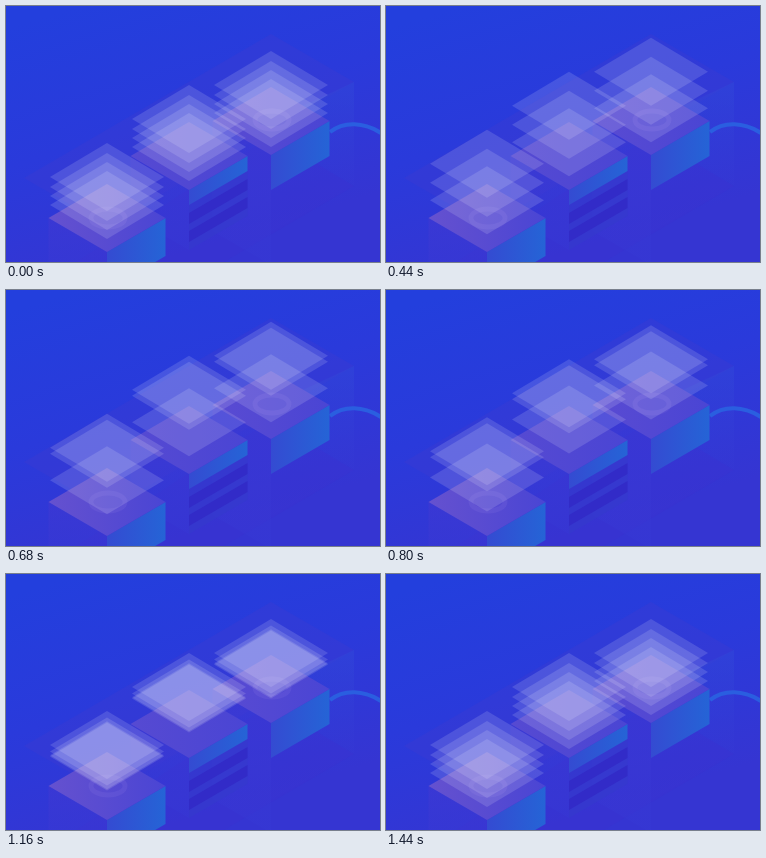
Recreate the animation shown at these times as an HTML page with a canvas. Size 374x256 px, loop 1.64 s.

```html
<!DOCTYPE html>
<html lang="en">
<head>
<meta charset="utf-8">
<title>Floating layers</title>
<style>
html, body { margin: 0; width: 100%; height: 100%; overflow: hidden; background: #283bd9; }
canvas { display: block; }
</style>
</head>
<body>
<canvas id="stage" width="374" height="256"></canvas>
<script>
const ctx = document.getElementById('stage').getContext('2d');
const LOOP = 1640, STEP = 40;
const HALF_W = 58.5, HALF_H = 34;

// Each phase slides its sheets from one height to another
const phases = [
  { start: 0, length: 560, slides: [[79, 62], [98, 81], [107, 101]] },
  { start: 560, length: 560, slides: [[62, 79], [68, 85], [101, 88]] },
  { start: 1120, length: 320, slides: [[79, 79], [85, 89], [88, 98], [88, 107]] }
];
const stacks = [{ x: 265, dy: 0 }, { x: 183, dy: 34 }, { x: 101, dy: 92 }];

function poly(points, fill) {
  ctx.beginPath();
  points.forEach(([x, y]) => ctx.lineTo(x, y));
  ctx.closePath();
  ctx.fillStyle = fill;
  ctx.fill();
}

function rhombus(x, y, w, h, fill) {
  poly([[x, y - h], [x + w, y], [x, y + h], [x - w, y]], fill);
}

function gradient(x0, y0, x1, y1, ...colors) {
  const g = ctx.createLinearGradient(x0, y0, x1, y1);
  colors.forEach((c, i) => g.addColorStop(i / (colors.length - 1), c));
  return g;
}

// Side of a box below a plate centred on x, y; side is 1 for right, -1 for left
function face(x, y, side, drop, height, fill) {
  const inner = y + HALF_H + drop, outer = y + drop, edge = x + side * HALF_W;
  poly([[x, inner], [edge, outer], [edge, outer + height], [x, inner + height]], fill);
}

function box(x, y, height, depth, plate) {
  face(x, y, -1, 0, depth, gradient(0, y, 0, y + depth + HALF_H, 'rgba(64,56,210,.6)', 'rgba(54,58,214,.3)'));
  face(x, y, 1, 0, height, gradient(x, 0, x + HALF_W, 0, '#344bd2', '#2564d6'));
  rhombus(x, y, HALF_W, HALF_H, gradient(x - HALF_W, y, x + HALF_W, y, plate, '#4a45d4'));
}

function emblem(x, y) {
  ctx.strokeStyle = 'rgba(150,125,225,.15)';
  ctx.lineWidth = 5;
  ctx.beginPath();
  ctx.ellipse(x, y, 17, 9, 0, 0, Math.PI * 2);
  ctx.stroke();
}

function scenery() {
  ctx.fillStyle = gradient(70, 0, 150, 256, '#233fdd', '#2a3adb', '#3535d2');
  ctx.fillRect(0, 0, 374, 256);

  // Back panel, side wall and floor
  poly([[18, 172], [265, 28], [348, 76], [101, 220]], 'rgba(62,58,208,.38)');
  poly([[265, 115], [348, 76], [348, 180], [265, 226]],
    gradient(0, 76, 0, 190, 'rgba(50,72,216,.5)', 'rgba(54,56,212,.2)'));
  poly([[265, 130], [348, 180], [218, 256], [70, 256]], 'rgba(62,48,204,.3)');

  box(265, 115, 35, 110, '#5a4bd2');

  face(183, 150, 1, 14, 46, 'rgba(54,58,206,.7)');
  for (const drop of [23, 41]) face(183, 150, 1, drop, 11, '#322bc8');
  box(183, 150, 15, 60, '#564ad2');
  box(101, 212, 38, 45, '#6551cf');
  emblem(266, 114);
  emblem(102, 212);

  ctx.strokeStyle = '#2a5ee0';
  ctx.lineWidth = 4;
  ctx.beginPath();
  ctx.moveTo(324, 126);
  ctx.bezierCurveTo(338, 115, 358, 116, 375, 127);
  ctx.stroke();
}

function draw(now) {
  // The loop opens on the resting pose that closes it
  const t = Math.floor((now % LOOP) / STEP) * STEP || LOOP;
  const { start, length, slides } = phases.findLast(p => t > p.start);
  const progress = Math.min(1, (t - start) / length);

  scenery();
  for (const { x, dy } of stacks) {
    for (const [from, to] of slides) {
      rhombus(x, from + (to - from) * progress + dy, 57, HALF_H, 'rgba(255,255,255,.135)');
    }
  }
  requestAnimationFrame(draw);
}
requestAnimationFrame(draw);
</script>
</body>
</html>
```
